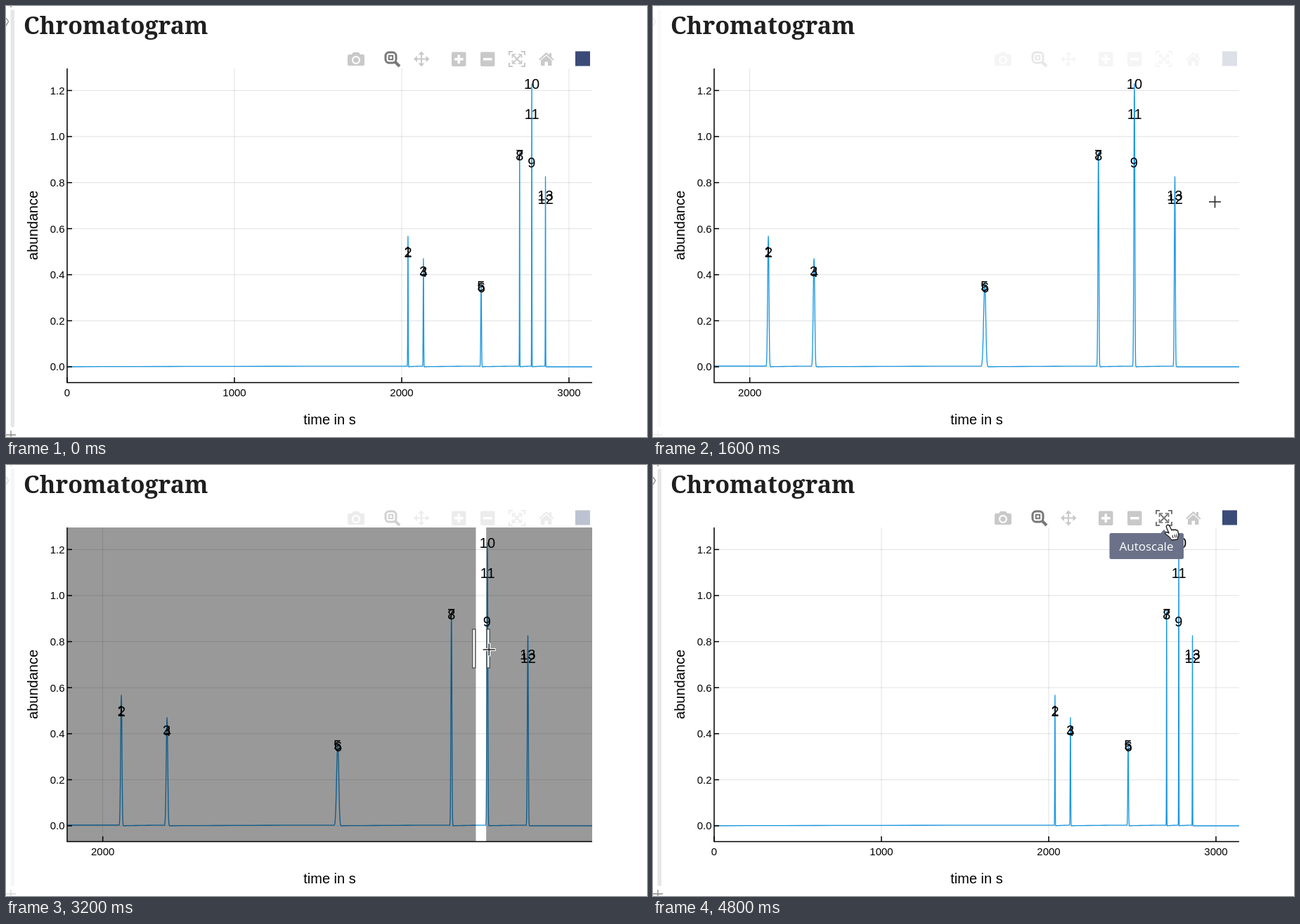
These frames come from a looping animation (912x614 px, 4.9 s). An HTML page:

```html
<!DOCTYPE html>
<html lang="en">
<head>
<meta charset="utf-8">
<title>Chromatogram</title>
<style>
html, body { margin: 0; width: 100%; height: 100%; overflow: hidden; background: #fff; }
svg { display: block; }
text { font-family: "Liberation Sans", Arial, sans-serif; }
.title { font: bold 34px "Noto Serif", serif; fill: #1f1f1f; }
.tick { font-size: 15px; }
.axis { font-size: 20px; }
.mark { font-size: 20px; text-anchor: middle; }
.grid { stroke: #000; stroke-opacity: .12; }
.line { stroke: #000; stroke-width: 1.5; fill: none; }
.curve { fill: none; stroke: #1c98e2; stroke-width: 1.35; stroke-linejoin: round; }
.grip { fill: #fff; stroke: #444; stroke-width: 1.2; }
.icon { fill: #c9c9c9; stroke: none; }
.stroke { fill: none; stroke: #c9c9c9; stroke-width: 2; }
.tipText { font: 17px "Open Sans", sans-serif; fill: #fff; }
</style>
</head>
<body>
<svg width="912" height="614" viewBox="0 0 912 614">
  <defs><clipPath id="area"><rect x="87" y="89" width="747" height="448"/></clipPath></defs>
  <text class="title" x="25" y="40">Chromatogram</text>

  <g id="chrome">
    <rect x="6.5" y="5" width="5.5" height="595" rx="2.5" fill="#e6e6e6"/>
    <path d="M0 17L3.5 22L0 28M7 0V2M0 611H14M7 605V614" fill="none" stroke="#888" stroke-width="1.3"/>
    <path class="icon" fill-rule="evenodd" d="M488 69H492L494 66H502L504 69H508Q510 69 510 71V83Q510 85 508 85H488Q486 85 486 83V71Q486 69 488 69ZM498 71A6 6 0 1 0 498 83A6 6 0 1 0 498 71Z"/>
    <circle class="icon" cx="498" cy="77" r="3.8"/>
    <g fill="none" stroke="#777">
      <rect x="540" y="66" width="15" height="15" rx="5" stroke-width="3"/>
      <path d="M553.5 79.5L560 86" stroke-width="4"/>
      <rect x="544.8" y="70.8" width="5.4" height="5.4" stroke-width="2"/>
    </g>
    <path class="stroke" d="M583 75.5H599M591 67.5V83.5"/>
    <path class="icon" d="M580 75.5L585 71V80ZM602.5 75.5L597.5 71V80ZM591 64.5L586.5 69.5H595.5ZM591 86.5L586.5 81.5H595.5Z"/>
    <rect class="icon" x="634" y="65.5" width="20.5" height="20.5" rx="2"/>
    <rect class="icon" x="675" y="65.5" width="20.5" height="20.5" rx="2"/>
    <path d="M638 75.8H650.5M644.2 69.5V82M679 75.8H691.5" stroke="#fff" stroke-width="3.4"/>
    <g id="auto" fill="none" stroke="#c9c9c9" stroke-width="2">
      <path d="M716 70V65H721M733 65H738V70M738 81V86H733M721 86H716V81"/>
      <path d="M721.5 70L732.5 81M732.5 70L721.5 81"/>
      <path d="M720.5 74V69H725.5M728.5 69H733.5V74M733.5 77V82H728.5M725.5 82H720.5V77" stroke-width="1.6"/>
    </g>
    <path class="icon" d="M758 76L768.7 66L773 70V67H776V72.8L779.5 76L778 77.5L768.7 69L759.5 77.5ZM761 77.5L768.7 70.8L776.4 77.5V85H771V79.5H766.5V85H761Z"/>
    <rect x="810" y="64.5" width="21" height="21" fill="#3b4b78"/>
  </g>

  <g id="plot"></g>
  <g id="zoom">
    <path id="shade" fill="#000" fill-rule="evenodd"/>
    <rect id="gripL" class="grip" width="4" height="55"/>
    <rect id="gripR" class="grip" width="4" height="55"/>
  </g>
  <g id="frame"></g>
  <g id="hover">
    <path d="M0 0L-7.5 -6V-13.5H-198V13.5H-7.5V6Z" fill="#0099f9" stroke="#fff" stroke-width="1.5"/>
    <text id="value" x="-194" y="6.2" font-size="17.6" fill="#fff"></text>
  </g>
  <g id="tip">
    <path d="M727 92L732 97.5H722Z" fill="#6b7188"/>
    <rect x="649.5" y="97" width="105.5" height="37" rx="2.5" fill="#6b7188"/>
    <text class="tipText" x="663.5" y="122">Autoscale</text>
  </g>
  <g id="cross" fill="none">
    <path d="M-9.5 0H9.5M0 -9.5V9.5" stroke="#fff" stroke-width="4"/>
    <path d="M-8.5 0H8.5M0 -8.5V8.5" stroke="#222" stroke-width="1.5"/>
  </g>
  <g id="hand">
    <path d="M0 1Q2 -1 4 2L7 8Q9 6 10 8Q12 6 13.5 8Q15.5 7 16 10L17 15L15 21L7 22Q4 17 -2 13Q-3 10 1 11L3 12L-.5 4Q-1 2 0 1Z" fill="#fff" stroke="#222" stroke-width="1.4" stroke-linejoin="round"/>
    <path d="M8 15L9 19M11 14L12 18.5M14 13.5V18" stroke="#222" stroke-width="1.1"/>
  </g>
</svg>
<script>
const LOOP = 4900, STEP = 100;
const L = 87, R = 834, T = 89, B = 536;
const FULL = [0, 3138.7], WIDE = [1928, 2989.5], NEAR = [2754.3, 2801.16];
const RISE = .003, LAG = 50, PICK = .7019535;

const $ = id => document.getElementById(id);
const ramp = (t, a, b) => Math.max(0, Math.min(1, (t - a) / (b - a)));
const easeOut = u => 1 - (1 - u) * (1 - u);
const toX = (s, [lo, hi]) => L + (s - lo) / (hi - lo) * (R - L);
const toY = v => 514 - v * 328;

// Labels sit on the curve, at offsets in units of the peak's width
const peaks = [
  { mid: 2037.6, h: .567, w: 1.35, tags: [-.55, .48] },
  { mid: 2130, h: .47, w: 1.55, tags: [-.55, .48] },
  { mid: 2475.2, h: .362, w: 2.2, tags: [-.3, .3] },
  { mid: 2705, h: .93, w: 1, tags: [-.15, .15] },
  { mid: 2777.644, h: 1.229, w: 1, tags: [-.88, 0, .45] },
  { mid: 2859.5, h: .826, w: 1, tags: [.47, -.51] }
];
const bell = d => Math.exp(-Math.pow(Math.abs(d) / (d < 0 ? 1.5 : 1.27), 2.1));

// The baseline creeps up before each skewed bell and drops back after it
const signal = [], marks = [];
let from = 0;
for (const { mid, h, w, tags } of peaks) {
  const start = mid - 3.4 * w;
  for (let u = 0; u < 1; u += .1)
    signal.push([from + (start - from) * u, RISE * Math.pow(u, .5)]);
  for (let d = -3.25; d < 3.4; d += .325)
    signal.push([mid + d * w, Math.max(h * bell(d), d < 0 ? RISE : 0)]);
  from = mid + 3.7 * w;
  signal.push([from, 0]);
  for (const d of tags)
    marks.push({ text: marks.length + 1, at: mid + d * w, y: toY(h * bell(d)) });
}
signal.push([3200, 0]);

const line = (cls, x1, y1, x2, y2) =>
  `<line class="${cls}" x1="${x1}" y1="${y1}" x2="${x2}" y2="${y2}"/>`;
const label = (cls, x, y, s, more = "") =>
  `<text class="${cls}" x="${x}" y="${y}" ${more}>${s}</text>`;
const middle = 'text-anchor="middle"';

function drawPlot(range) {
  const inside = s => s >= range[0] && s <= range[1];
  let back = "", front = "";
  for (let i = 0; i <= 6; i++) {
    const y = toY(i * .2);
    back += line("grid", L, y, R, y);
    front += line("line", L, y, L + 7, y) +
      label("tick", 83.5, y + 5.3, (i * .2).toFixed(1), 'text-anchor="end"');
  }
  for (let s = 0; s <= 3000; s += 1000) {
    if (!inside(s)) continue;
    const x = toX(s, range);
    back += line("grid", x, T, x, B);
    front += line("line", x, B - 7, x, B) + label("tick", x, 556, s, middle);
  }
  const pts = signal.map(([s, v]) => toX(s, range).toFixed(2) + "," + toY(v).toFixed(2));
  back += `<polyline class="curve" points="${pts.join(" ")}" clip-path="url(#area)"/>`;
  for (const m of marks)
    if (inside(m.at)) back += label("mark", toX(m.at, range), m.y + 7.2, m.text);
  front += `<path class="line" d="M${L} ${T}V${B + .5}H${R}"/>` +
    label("axis", 460.5, 596, "time in s", middle) +
    label("axis", 0, 0, "abundance", middle + ' transform="translate(44.5 312.5) rotate(-90)"');
  $("plot").innerHTML = back;
  $("frame").innerHTML = front;
}

// Pointer strokes: begin, end, x, y reached
const legs = [
  [0, 100, 534, 248],
  [100, 250, 546.5, 254.5],
  [280, 1200, 799.5, 270],
  [1200, 1500, 799.5, 279],
  [1700, 2050, 816, 270],
  [2050, 2600, 670, 263],
  [2850, 2950, 668.5, 261.5],
  [3000, 3650, 704.5, 264.5],
  [3850, 4200, 712.5, 120.5],
  [4200, 4450, 732, 86]
];
function pointer(t) {
  let [, , x, y] = legs[0];
  for (const [a, b, toX, toY] of legs) {
    const u = easeOut(ramp(t, a, b));
    x += (toX - x) * u;
    y += (toY - y) * u;
  }
  return [x, y];
}

const drags = [[280, 1500], [3000, 3700]];
const show = (id, on) => $(id).setAttribute("display", on ? "inline" : "none");
const move = (id, x, y) => $(id).setAttribute("transform", `translate(${x} ${y})`);

function drawZoom(t, begin) {
  const [x0, y0] = pointer(begin), [x1] = pointer(t - LAG);
  $("shade").setAttribute("d", `M${L} ${T}H${R}V${B}H${L}ZM${x0} ${T}H${x1}V${B}H${x0}Z`);
  $("shade").setAttribute("fill-opacity", .4 * ramp(t, begin, begin + 200));
  for (const [id, x] of [["gripL", x0 - 4.7], ["gripR", x1 + 1]]) {
    $(id).setAttribute("x", x);
    $(id).setAttribute("y", y0 - 27.5);
  }
}

let view;
function draw(t) {
  const next = t < 1500 || t >= 4700 ? FULL : t < 3700 ? WIDE : NEAR;
  if (next !== view) drawPlot(view = next);

  let chrome = 1;
  for (const [a, b] of drags)
    chrome += ramp(t, b + 60, b + 300) - ramp(t, a, a + 300);
  $("chrome").setAttribute("opacity", chrome);

  const drag = drags.find(([a, b]) => t > a && t < b);
  show("zoom", drag);
  if (drag) drawZoom(t, drag[0]);

  const [x, y] = pointer(t);
  const near = !drag && y > T && peaks.find(p => p.h > PICK && Math.abs(toX(p.mid, view) - x) < 20);
  show("hover", near);
  if (near) {
    move("hover", toX(near.mid, view) - 3, toY(PICK));
    const time = near.mid.toLocaleString("en-US", { minimumFractionDigits: 3 });
    $("value").textContent = `(${time}, ${PICK})`;
  }

  const onIcon = t >= 4400;
  show("cross", t >= 100 && !onIcon);
  show("hand", onIcon);
  show("tip", onIcon);
  $("auto").setAttribute("stroke", onIcon ? "#777" : "#c9c9c9");
  move("cross", x, y);
  move("hand", x - 1, y - 1);
}

function tick() {
  draw(Math.floor(performance.now() % LOOP / STEP) * STEP);
  requestAnimationFrame(tick);
}
tick();
</script>
</body>
</html>
```
